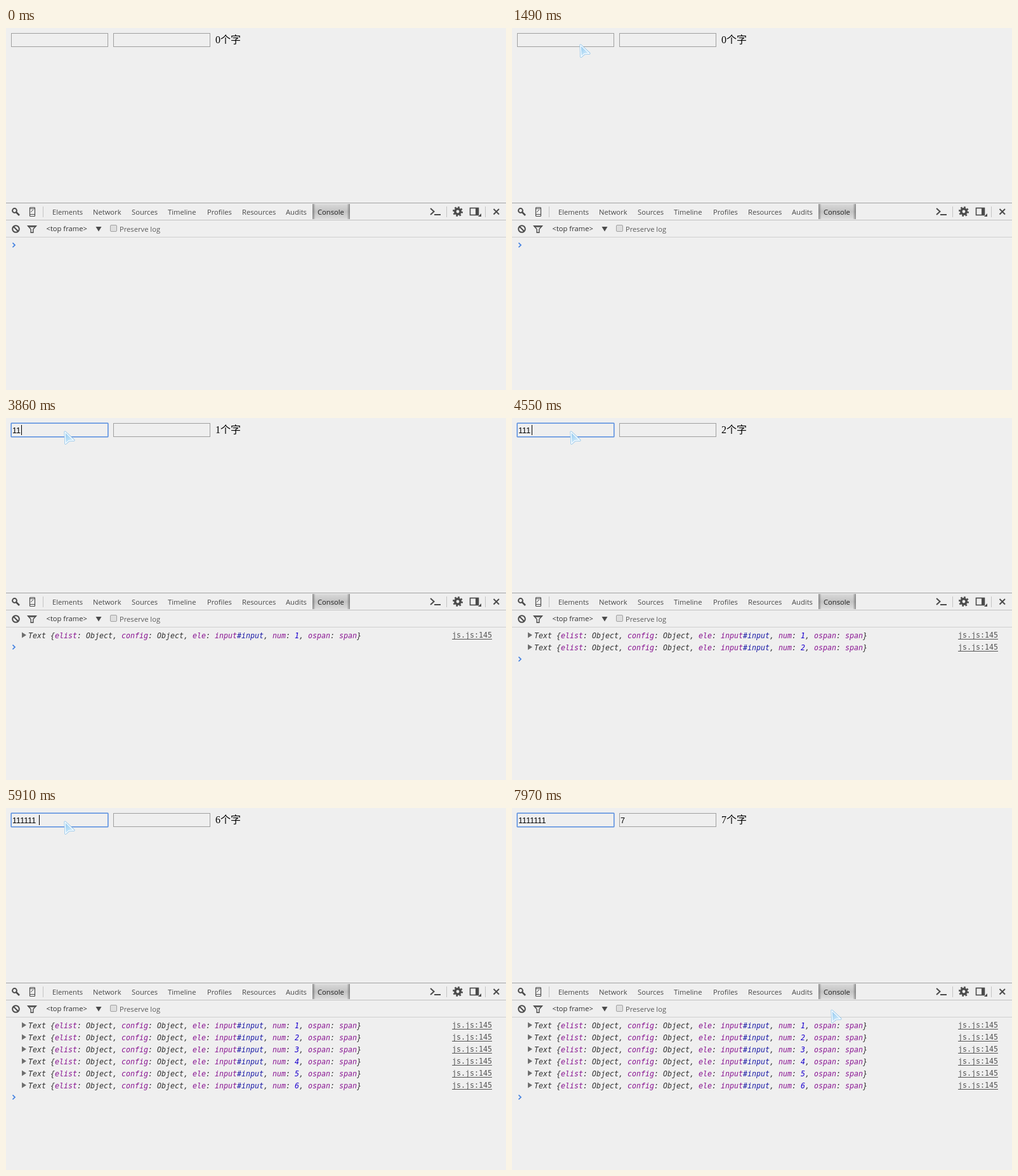
These frames come from a looping animation (788x572 px, 8000 ms). An HTML page:

```html
<!DOCTYPE html>
<html lang="en">
<head>
<meta charset="utf-8">
<title>Character counter</title>
<style>
  html, body { margin: 0; width: 100%; height: 100%; overflow: hidden; background: #efefef; }
  svg { display: block; width: 788px; height: 572px; }
  text { white-space: pre; }
  .ui { font: 11.2px "Open Sans", sans-serif; fill: #484848; }
  .field { font: 12.6px "Liberation Sans", Arial, sans-serif; fill: #000; }
  .count { font: 300 16px "Liberation Serif", "Noto Sans CJK SC", "Noto Sans CJK", serif; }
  .log { font: italic 11.63px "DejaVu Sans Mono", monospace; fill: #303030; }
  .link { font: 11.63px "DejaVu Sans Mono", monospace; fill: #545454; }
  .key { fill: #881391; }
  .num { fill: #1c00cf; }
  .id { fill: #1a1aa6; }
  .icon { fill: none; stroke: #4b4b4b; stroke-width: 2; }
  .solid { fill: #4b4b4b; }
</style>
</head>
<body>
<svg viewBox="0 0 788 572">
  <defs>
    <linearGradient id="tab" x2="0" y2="1">
      <stop stop-color="#d9d9d9"/>
      <stop offset=".5" stop-color="#c3c3c3"/>
      <stop offset="1" stop-color="#dcdcdc"/>
    </linearGradient>
    <linearGradient id="edge">
      <stop stop-opacity=".36"/>
      <stop offset=".08" stop-opacity="0"/>
      <stop offset=".92" stop-opacity="0"/>
      <stop offset="1" stop-opacity=".36"/>
    </linearGradient>
    <linearGradient id="arrow" x2=".7" y2="1">
      <stop stop-color="#8fc6ee"/>
      <stop offset="1" stop-color="#d9f0fd"/>
    </linearGradient>
  </defs>

  <!-- page -->
  <g fill="none" stroke="#a0a0a0">
    <rect x="8.5" y="8.5" width="152" height="21"/>
    <rect x="169.5" y="8.5" width="152" height="21"/>
  </g>
  <g id="ring" fill="none" stroke="#5e92e0">
    <rect x="7.5" y="7.5" width="154" height="23" rx="1.5" opacity=".6"/>
    <rect x="8.5" y="8.5" width="152" height="21"/>
  </g>
  <text id="typed" class="field" x="10" y="24"></text>
  <text id="total" class="field" x="171" y="24"></text>
  <rect id="caret" y="11" width="1" height="16"/>
  <text id="count" class="count" x="330" y="24"></text>

  <!-- toolbars -->
  <path d="M0 276.5H788" stroke="#a3a3a3"/>
  <path d="M0 303.5H788" stroke="#c0c0c0"/>
  <path d="M0 330.5H788" stroke="#d0d0d0"/>
  <path d="M58.5 282V299M694.5 282V299M755.5 282V299" stroke="#c4c4c4"/>
  <rect x="483" y="278" width="59" height="24" fill="url(#tab)"/>
  <rect x="483" y="278" width="59" height="24" fill="url(#edge)"/>
  <g id="tabs" class="ui"></g>

  <g class="icon">
    <circle cx="13.5" cy="288.5" r="3.4"/>
    <path d="M16 291L21 296" stroke-width="2.6"/>
    <rect x="37.5" y="283.5" width="8" height="14" rx="1" stroke-width="1.2"/>
    <path d="M37 285.5H46M37 294.5H46M39 291L43 287" stroke-width="1"/>
    <path d="M669 285L674.5 290L669 295M675 295H685"/>
    <circle cx="712" cy="290" r="4.2" stroke-width="3.6"/>
    <circle cx="712" cy="290" r="6.7" stroke-width="2.6" stroke-dasharray="2.63 2.63"/>
    <rect x="731.5" y="284.5" width="13" height="11" stroke-width="1.6"/>
    <path d="M768.5 286L777 294.5M777 286L768.5 294.5"/>
    <circle cx="15.5" cy="317.5" r="5.3"/>
    <path d="M11.8 313.8L19.2 321.2"/>
    <path d="M34.5 312.6H47.5L42.8 318V323.2H39.2V318Z" stroke-width="1.4"/>
    <path d="M36 314H46" stroke-width="1.6"/>
  </g>
  <g class="solid">
    <path d="M740 285H745V296H740Z"/>
    <path d="M749 293V298H744Z"/>
    <path d="M141.5 314H150.5L146 321.5Z"/>
  </g>
  <text class="ui" x="63.5" y="321" style="fill:#303030">&lt;top frame&gt;</text>
  <rect x="164.5" y="311.5" width="10" height="10" rx="1.5" fill="#dedede" stroke="#a2a2a2"/>
  <text class="ui" x="179" y="322" style="fill:#5a5a5a">Preserve log</text>

  <!-- console -->
  <g id="rows"></g>
  <path id="prompt" d="M10.5 339.5L14 343L10.5 346.5" fill="none" stroke="#3f7fe0" stroke-width="1.7"/>

  <g id="cursor" stroke-linejoin="round">
    <path id="shape" d="M1 1L1.8 19.5L7 14.8L15 14.2Z" fill="#7fb9e6" stroke="#8cc2ea" stroke-width="3"/>
    <path d="M1 1L1.8 19.5L7 14.8L15 14.2Z" fill="url(#arrow)" stroke="#f7fcff" stroke-width="1.5"/>
  </g>
</svg>
<script>
const LOOP = 8000;
const $ = id => document.getElementById(id);

const keyTimes = [3190, 3860, 4550, 5000, 5410, 5840, 6310];
const countTimes = [3380, 4120, 4610, 5060, 5470, 5910, 6370];
const MAX_ROWS = 6;
const focusTime = 1590;
const totalTime = 6460;
const caretToggles = [
  focusTime, 1910, 2220, 2530, 2860, 3570, 3860, 4280, 4550, 4710,
  5000, 5160, 5410, 5560, 5840, 6010, 6310, 7770
];

// time, x, y of the pointer tip
const path = [
  [90, 772, 494], [290, 660, 408], [490, 450, 255], [690, 275, 138], [890, 200, 89],
  [1090, 150, 53], [1290, 120, 33], [1490, 107, 26], [1690, 92, 21],
  [6340, 92, 21], [6440, 101, 29], [6640, 101, 29], [6740, 125, 48], [6840, 190, 94],
  [7040, 380, 228], [7140, 440, 271], [7240, 456, 283], [7470, 473, 294], [7970, 503, 319]
];
const legs = [90, 6340, 7470];
const STEP = 100;

const tabs = {
  Elements: 73, Network: 137, Sources: 198, Timeline: 255,
  Profiles: 317, Resources: 372, Audits: 441, Console: 491
};
$("tabs").innerHTML = Object.entries(tabs).map(([name, x]) =>
  `<text x="${x}" y="295"${name === "Console" ? ' style="fill:#222"' : ""}>${name}</text>`).join("");

const span = (type, text) => `<tspan class="${type}">${text}</tspan>`;
const key = name => span("key", name);

function logRow(n) {
  const fields = [
    key("elist") + ": Object",
    key("config") + ": Object",
    key("ele") + ": " + key("input") + span("id", "#input"),
    key("num") + ": " + span("num", n),
    key("ospan") + ": " + key("span")
  ];
  return `<g transform="translate(0 ${19 * (n - 1)})">
    <path d="M25 338.5L32 343L25 347.5Z" fill="#6e6e6e"/>
    <text class="log" x="35" y="348">Text {${fields.join(", ")}}</text>
    <text class="link" x="703" y="347">js.js:145</text>
    <path d="M703 349.5H766" stroke="#545454"/></g>`;
}
$("rows").innerHTML = Array.from({ length: MAX_ROWS }, (_, i) => logRow(i + 1)).join("");

const passed = (times, t) => times.filter(time => time <= t).length;
const show = (el, on) => el.setAttribute("visibility", on ? "visible" : "hidden");
const move = (el, x, y) => el.setAttribute("transform", `translate(${x} ${y})`);

function pointerAt(t) {
  const start = legs[passed(legs, t) - 1];
  const held = start + Math.floor((t - start) / STEP) * STEP;
  const next = path.findIndex(p => p[0] > held);
  if (next < 0) return path[path.length - 1].slice(1);
  const [t0, x0, y0] = path[next - 1];
  const [t1, x1, y1] = path[next];
  const k = (held - t0) / (t1 - t0);
  return [Math.round(x0 + (x1 - x0) * k), Math.round(y0 + (y1 - y0) * k)];
}

function draw(t) {
  const typed = passed(keyTimes, t);
  const count = passed(countTimes, t);
  const rows = Math.min(count, MAX_ROWS);

  $("typed").textContent = "1".repeat(typed);
  $("total").textContent = t >= totalTime ? "7" : "";
  $("count").textContent = count + "个字";
  $("caret").setAttribute("x", 10 + 7 * typed);
  show($("caret"), passed(caretToggles, t) % 2);
  show($("ring"), t >= focusTime);

  [...$("rows").children].forEach((row, i) => show(row, i < rows));
  move($("prompt"), 0, 19 * rows);

  const visible = t >= legs[0];
  show($("cursor"), visible);
  if (visible) move($("cursor"), ...pointerAt(t));
}

function tick() {
  draw(performance.now() % LOOP);
  requestAnimationFrame(tick);
}
tick();
</script>
</body>
</html>
```
